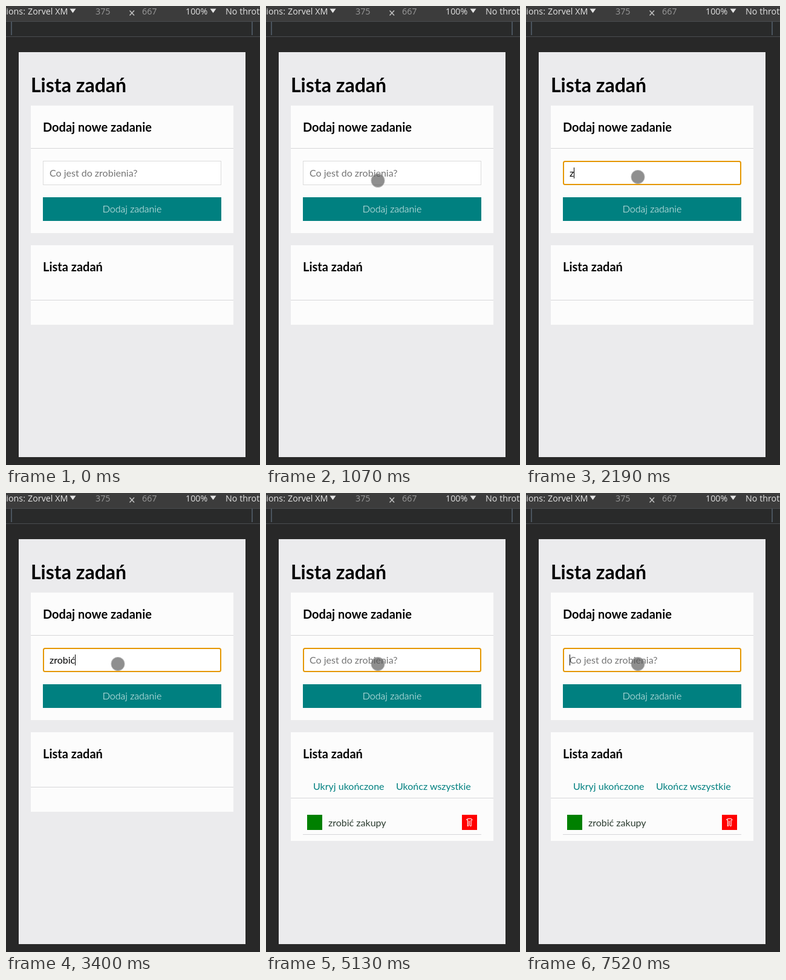
Write an HTML page that moves like this. It is 420 by 756 pixels and loops after 8 s.

```html
<!DOCTYPE html>
<html lang="pl">
<head>
<meta charset="utf-8">
<title>Lista zadań</title>
<style>
  html, body { margin: 0; width: 100%; height: 100%; overflow: hidden; background: #282828; }
  svg { display: block; width: 420px; height: 756px; }
  text { font: 16px Lato, sans-serif; white-space: pre; }
  .bar text { font: 14.3px "Open Sans", sans-serif; fill: #e3e3e3; }
  .bar .dim { fill: #9a9a9a; }
  .bar path { fill: #e3e3e3; }
  .card { fill: #fcfcfc; }
  .rule { fill: #d7d7d9; }
  .teal { fill: #008080; }
  text.title { font-size: 32px; font-weight: 700; }
  text.heading { font-size: 20px; font-weight: 700; }
  text.button { font-weight: 300; fill: #fff; text-anchor: middle; }
</style>
</head>
<body>
<svg viewBox="0 0 420 756">
  <rect width="420" height="756" fill="#282828"/>
  <g class="bar">
    <rect width="420" height="25" fill="#3c3c3c"/>
    <rect y="25" width="420" height="1" fill="#494c50"/>
    <rect y="26" width="420" height="24" fill="#292a2a"/>
    <rect y="50" width="420" height="1" fill="#494c50"/>
    <rect x="8" y="26" width="2" height="22" fill="#4a545e"/>
    <rect x="406" y="26" width="2" height="22" fill="#4a545e"/>
    <text x="32" y="14" text-anchor="end">Dimensions:</text>
    <text x="36" y="14">Zorvel XM</text>
    <path d="M105.500 4.500h10l-5 7zM337.500 4.500h10l-5 7z"/>
    <text class="dim" x="148" y="14">375</text>
    <path d="M204.500 7.500l7.500 8M212 7.500l-7.500 8" stroke="#c4c4c4" stroke-width="1.500"/>
    <text class="dim" x="225" y="14">667</text>
    <text x="297" y="14">100%</text>
    <text x="363" y="14">No throttling</text>
  </g>

  <rect x="21" y="76" width="375" height="667" fill="#ebebed"/>
  <text class="title" x="41" y="142">Lista zadań</text>

  <rect class="card" x="41" y="164" width="335" height="210"/>
  <text class="heading" x="61" y="207">Dodaj nowe zadanie</text>
  <rect class="rule" x="41" y="234" width="335" height="1"/>
  <rect id="field" fill="#fff"/>
  <text id="entry" x="72" y="281"></text>
  <rect id="caret" y="266" width="1" height="18"/>
  <rect class="teal" x="61" y="315" width="295" height="39"/>
  <text class="button" x="208.500" y="340">Dodaj zadanie</text>

  <rect id="list" class="card" x="41" y="394" width="335"/>
  <text class="heading" x="61" y="437">Lista zadań</text>
  <rect id="listRule" class="rule" x="41" width="335" height="1"/>
  <g id="task">
    <text class="teal" x="78" y="489">Ukryj ukończone</text>
    <text class="teal" x="215" y="489">Ukończ wszystkie</text>
    <rect x="68" y="530" width="25" height="25" fill="#008000"/>
    <text x="103" y="549" fill="#2c3c30">zrobić zakupy</text>
    <rect x="324" y="530" width="25" height="25" fill="#f00"/>
    <path d="M332 539v-1.500l2-1h5l1.500 1v2M333.500 538v10.500h1.500M336 540v8M339 539v9.500h-2" fill="none" stroke="#fff" stroke-width="1.200"/>
    <rect class="rule" x="61" y="562" width="295" height="1"/>
  </g>
  <circle id="pointer" r="10.500" fill="#505050" fill-opacity=".64" stroke="#8c8c8c" stroke-opacity=".65" stroke-width="2"/>
</svg>
<script>
const LOOP = 8000, FOCUS = 1410, SUBMIT = 5130;
const PHRASE = 'zrobić zakupy';
const keyTimes = [2190, 2460, 2730, 2930, 3000, 3400, 3660, 3770, 3890, 4000, 4200, 4400, 4600];
const caretToggles = [FOCUS, 1920, 2190, 5060, 5590, 6050, 6580, 7060, 7520];
// time, x, y
const pointerPath = [
  [530, 322, 718], [670, 270, 560], [800, 215, 410], [930, 180, 312],
  [1000, 178, 295], [1070, 185, 287.5], [1200, 185, 280], [1330, 185, 281.5]
];

const $ = id => document.getElementById(id);
const [field, entry, caret, list, listRule, task, pointer] =
  ['field', 'entry', 'caret', 'list', 'listRule', 'task', 'pointer'].map($);
const set = (el, attrs) => { for (const k in attrs) el.setAttribute(k, attrs[k]); };
const show = (el, on) => el.setAttribute('visibility', on ? 'visible' : 'hidden');
const passed = (times, t) => times.filter(x => x <= t).length;

function pointerAt(t) {
  const stepped = 530 + Math.floor((t - 530) / 67.5 + 0.01) * 67.5;
  const i = pointerPath.findIndex(p => p[0] > stepped);
  if (i < 0) return pointerPath.at(-1).slice(1);
  if (i === 0) return pointerPath[0].slice(1);
  const a = pointerPath[i - 1], b = pointerPath[i];
  const k = (stepped - a[0]) / (b[0] - a[0]);
  return [a[1] + (b[1] - a[1]) * k, a[2] + (b[2] - a[2]) * k];
}

function draw(t) {
  const done = t >= SUBMIT;
  const typed = done ? '' : PHRASE.slice(0, passed(keyTimes, t));

  set(field, t >= FOCUS
    ? { x: 62, y: 256, width: 293, height: 38, rx: 2.5, stroke: '#e59700', 'stroke-width': 2 }
    : { x: 61.5, y: 255.5, width: 294, height: 39, rx: 0, stroke: '#dcdcdc', 'stroke-width': 1 });
  entry.textContent = typed || 'Co jest do zrobienia?';
  set(entry, { fill: typed ? '#000' : '#757575' });

  show(caret, passed(caretToggles, t) % 2);
  set(caret, { x: typed ? Math.floor(72 + entry.getComputedTextLength()) : 72 });

  set(list, { height: done ? 179 : 131 });
  set(listRule, { y: done ? 502 : 484 });
  show(task, done);

  const [x, y] = pointerAt(t);
  show(pointer, t >= 530);
  set(pointer, { cx: x, cy: y });
}

const start = performance.now();
function frame() {
  draw((performance.now() - start) % LOOP);
  requestAnimationFrame(frame);
}
frame();
</script>
</body>
</html>
```
